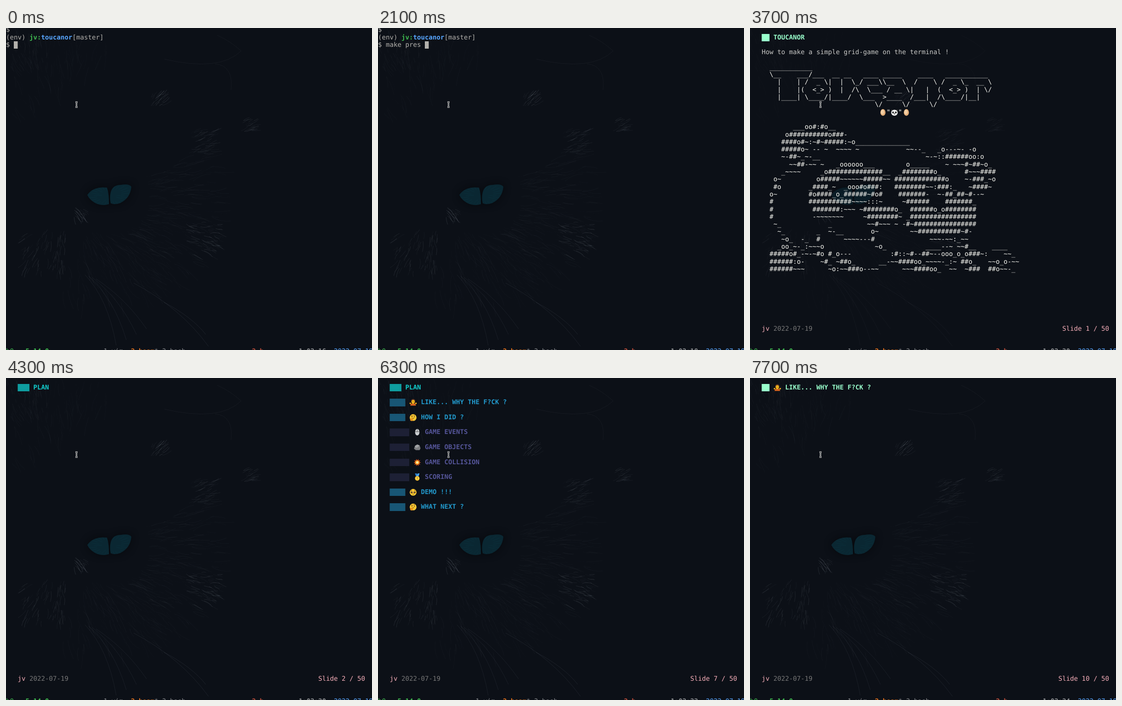
These frames come from a looping animation (797 px wide and 702 px high, 8000 ms). An HTML page with a canvas:

```html
<!DOCTYPE html>
<html lang="en">
<head>
<meta charset="utf-8">
<title>Terminal slides</title>
<style>
  html, body { margin: 0; width: 100%; height: 100%; overflow: hidden; background: #0c1017; }
  #cat, #pointer, #screen { position: absolute; left: 0; top: 0; }
  #screen {
    width: 797px; height: 702px; overflow: hidden;
    font: 14.12px/16.3px "DejaVu Sans Mono", monospace;
    text-rendering: geometricPrecision; font-variant-ligatures: none;
  }
  #screen > * { position: absolute; white-space: pre; }
</style>
</head>
<body>
<canvas id="cat" width="797" height="702"></canvas>
<div id="screen"></div>
<svg id="pointer" width="797" height="702" fill="none">
  <path id="beam" d="M151 161.500h5M153.500 161.500v11M151 172.500h5" stroke="#dcdcdc" stroke-width="3"/>
  <use href="#beam" style="stroke:#111"/>
  <path d="M151 161.500h5M153.500 161.500v11M151 172.500h5" stroke="#16181c" stroke-width="1"/>
</svg>
<script>
const LOOP = 8000, CW = 8.5, RH = 16.3, TOP = -3.7;
const USER = 'jv', DATE = '2022-07-19', COMMAND = 'make pres ';
const GREY = '#b3b1ad', GREEN = '#3fb950', BLUE = '#58a6ff', PINK = '#f7afba', DIM = '#777777', TAB = '#8b8d90';

// Key press times: one per typed character, then one per slide
const TYPING = [800, 800, 900, 1100, 1200, 1400, 1500, 1700, 2100, 2100];
const SLIDES = [3300, 4300, 4800, 5100, 5400, 5800, 6300, 6700, 7100, 7700];
const passed = (times, t) => times.filter(x => x <= t).length;

// The clock redraws every 100 ms, and stands still while the slides load
function seconds(t) {
  const q = t >= 2100 && t < SLIDES[0] ? 2100 : Math.floor(t / 100) * 100;
  return 16 + Math.floor((q + 520) / 1015);
}

// Text and bar colour of each heading level; level n has a bar of n + 1 columns
const LEVELS = {
  1: ['#99ffcc', '#99ffcc'],
  2: ['#11cccc', '#0f9da0'],
  3: ['#2299cc', '#185675'],
  4: ['#555599', '#1d2035']
};

// [slide of first appearance, level, icon, text]
const PLAN = [
  [2, 2, '', 'PLAN'],
  [3, 3, 'shrug', 'LIKE... WHY THE F?CK ?'],
  [4, 3, 'think', 'HOW I DID ?'],
  [5, 4, 'mouse', 'GAME EVENTS'],
  [5, 4, 'rock', 'GAME OBJECTS'],
  [5, 4, 'boom', 'GAME COLLISION'],
  [5, 4, 'medal', 'SCORING'],
  [6, 3, 'plead', 'DEMO !!!'],
  [7, 3, 'think', 'WHAT NEXT ?'],
  [8, 4, 'rock', 'GAME LEVELS'],
  [8, 4, 'mouse', 'GAME MENU'],
  [8, 4, 'medal', 'HIGH SCORES'],
  [9, 3, 'shrug', 'QUESTIONS ?']
];

const ART = String.raw`
___________
\__    ___/___  __ __   ____ _____    ____   ___________
  |    | /  _ \|  |  \_/ ___\\__  \  /    \ /  _ \_  __ \
  |    |(  <_> )  |  /\  \___ / __ \|   |  (  <_> )  | \/
  |____| \____/|____/  \___  >____  /___|  /\____/|__|
                           \/     \/     \/
                              "  "

      ___oo#:#o__
    o##########o###-
   ####o#~:~#~#####:~o______________
   #####o~ -- ~  ~~~~ ~            ~~--_   _o---~- -o
   ~-##~_~-__                           ~-~::######oo:o
     ~~##-~~ ~   _oooooo___        o_____    ~ ~~~#~##~o_
   _~~~~     _o##############__  _########o_      #~~~####
 o~         o#####~~~~~~#####~~ #############o    ~-###_~o
 #o       _####_~  _ooo#o###:   ########~~:###:_   ~####~
o~        #o####_o_######~#o#    #######-  ~-##_##~#--~
#         ###########~~~~:::~     ~######    #######_
#          #######:~~~ ~########o_  ######o_o########
#          -~~~~~~~     ~########~ _#################
 ~_            _         ~~#~~~ ~ -#~################
  ~_        _  ~-__       o~        ~~###########~#-
   ~o_  -_  #      ~~~~---#              ~~~-~~:_~~
  _oo_~-_:~~~o             ~o_          ____--~ ~~#__    ____
#####o#_-~-~#o #_o---          :#::~#--##~--ooo_o_o###~:    ~~_
######:o-    ~#_ ~##o_      __-~~####oo_~~~~-_:~ ##o_   ~~o_o-~~
######~~~      ~o:~~###o--~~      ~~~####oo_  ~~  ~###  ##o~~-_`.split('\n').slice(1);

const oval = (x, y, rx, ry, fill) => `<ellipse cx="${x}" cy="${y}" rx="${rx}" ry="${ry}" fill="${fill}"/>`;
const circle = (x, y, r, fill) => oval(x, y, r, r, fill);
const pair = (dx, y, r, fill) => circle(8 - dx, y, r, fill) + circle(8 + dx, y, r, fill);
const shape = (d, fill) => `<path d="${d}" fill="${fill}"/>`;
const line = (d, color) => `<path d="${d}" fill="none" stroke="${color}"/>`;
const star = (r, fill) => {
  const pts = Array.from({ length: 20 }, (_, i) => {
    const k = i % 2 ? r * 0.55 : r, a = i * Math.PI / 10;
    return (8 + k * Math.cos(a)).toFixed(1) + ',' + (8 + k * Math.sin(a)).toFixed(1);
  });
  return `<polygon points="${pts}" fill="${fill}"/>`;
};
const face = circle(8, 8, 7.3, '#fcc934');

// Small pictures on a 16 x 16 box
const ICONS = {
  egg: oval(8, 8, 5.5, 7.2, '#e3ad78') + oval(7, 7, 3.5, 5, '#f3cfa4'),
  panda: pair(5, 4, 2.4, '#333') + oval(8, 8.5, 7, 6.4, '#f4f4f4') + pair(3, 8, 2, '#333') + oval(8, 11, 1.5, 1, '#222'),
  shrug: shape('M2 15Q2 10 8 10T14 15Z', '#d9641e') + circle(8, 5.4, 4.6, '#6b3c24') +
    oval(8, 6.8, 3.4, 3.8, '#fcc21b') + pair(6, 10, 1.7, '#f9b21d') + pair(1.4, 6.8, 0.6, '#402'),
  think: face + pair(2.5, 6.3, 1, '#4a3010') + line('M4 4L7 4.500M9 3.500L12 3M6 10L10 9.500', '#5b3b13') + circle(4.5, 12.5, 3, '#e8921b'),
  mouse: oval(8, 8, 4.7, 7, '#c9cdd0') + line('M8 1V7M3.500 7H12.500', '#666'),
  rock: shape('M1 11L3 5L8 2L13 4L15 10L13 14H5Z', '#7b7d80') + shape('M3 5L8 2L13 4L9 8L5 9Z', '#a0a2a4'),
  boom: star(8, '#e8501e') + star(6, '#fca21c') + star(3.5, '#fff2a8'),
  medal: shape('M3 0H7L10 6L6 8Z', '#2e7fd0') + shape('M13 0H9L6 6L10 8Z', '#4ba3ea') +
    circle(8, 10.6, 5, '#f0b429') + circle(8, 10.6, 3.7, '#ffd84f') + line('M7 9L8 8.500V13', '#a8700c'),
  plead: face + pair(3.1, 8, 2.2, '#573a17') + pair(2.6, 7.3, 0.7, '#fff') + line('M3 4.500L5.500 3M13 4.500L10.500 3M6.500 12H9.500', '#6b4515')
};

const rowTop = row => TOP + row * RH;
const place = (col, row) => `left:${col * CW}px;top:${rowTop(row).toFixed(2)}px`;
const esc = s => s.replace(/&/g, '&amp;').replace(/</g, '&lt;');
const text = (col, row, s, color, tag = 'span') => `<${tag} style="${place(col, row)};color:${color}">${esc(s)}</${tag}>`;
const bold = (col, row, s, color) => text(col, row, s, color, 'b');
const icon = (col, row, name) => `<svg style="${place(col, row)}" width="17" height="16.3" viewBox="0 0 16 16">${ICONS[name]}</svg>`;

// Whole pixel rows, soft column edges
function bar(col, row, cols, color) {
  const y = Math.round(rowTop(row)), h = Math.round(rowTop(row + 1)) - y;
  return `<svg style="left:0;top:0" width="797" height="702"><rect x="${col * CW}" y="${y}" width="${cols * CW}" height="${h}" fill="${color}"/></svg>`;
}

function heading(row, level, name, label) {
  const [color, fill] = LEVELS[level], col = level + 5;
  return bar(3, row, level + 1, fill) + (name ? icon(col, row, name) : '') +
    bold(name ? col + 3 : col, row, label, color);
}

function shell(typed) {
  return text(0, 0, '$', GREY) + text(0, 1, '(env)', GREY) + bold(6, 1, USER + ':', GREEN) +
    bold(9, 1, 'toucanor', BLUE) + text(17, 1, '[master]', GREY) +
    text(0, 2, '$ ' + typed, GREY) + bar(2 + typed.length, 2, 1, GREY);
}

function cover() {
  return heading(1, 1, '', 'TOUCANOR') +
    text(3, 3, 'How to make a simple grid-game on the terminal !', '#c8c8c6') +
    ART.map((s, i) => text(5, 5 + i, s, '#f8f8f2')).join('') +
    icon(33, 11, 'egg') + icon(36, 11, 'panda') + icon(39, 11, 'egg');
}

const plan = n => PLAN.map(([from, ...item], i) => n >= from ? heading(1 + 2 * i, ...item) : '').join('');

function slide(n) {
  const count = `Slide ${n} / 50`;
  const body = n === 1 ? cover() : n < 10 ? plan(n) : heading(1, 1, 'shrug', PLAN[1][3]);
  return body + text(3, 40, USER, PINK) + text(6, 40, DATE, DIM) + text(92 - count.length, 40, count, PINK);
}

function status(sec) {
  return text(0, 43, 'h0', GREEN) + bold(5, 43, '5.14.0', GREEN) + text(25, 43, '1 vim', TAB) +
    bold(32, 43, '2 beam', '#e0701c') + text(38, 43, '* 3 bash', TAB) +
    bold(63, 43, '2 b', '#c0503c') + bold(75, 43, '1:02:' + sec, TAB) + text(84, 43, DATE, BLUE);
}

// Bright tufts of fur: x, y, radius, strength
const TUFTS = [
  [330, 158, 14, 0.15], [426, 250, 26, 0.1], [526, 215, 14, 0.12], [428, 460, 36, 0.13],
  [85, 485, 46, 0.11], [158, 405, 14, 0.16], [30, 40, 60, 0.06]
];

// Wallpaper: seeded hairs that flow away from the brow, and one eye
function drawCat() {
  const g = cat.getContext('2d');
  let seed = 7;
  const rnd = () => (seed = seed * 16807 % 2147483647) / 2147483647;
  const spread = k => (rnd() - 0.5) * 2 * k;

  const curve = (x, y, cx, cy, ex, ey, a) => {
    g.strokeStyle = `rgba(150,158,168,${a})`;
    g.beginPath();
    g.moveTo(x, y);
    g.quadraticCurveTo(cx, cy, ex, ey);
    g.stroke();
  };
  const hair = (x, y, len, a) => {
    const dir = Math.atan2(y - 365, x - 125) + spread(0.3), bend = dir + spread(0.4);
    curve(x, y, x + Math.cos(bend) * len / 2, y + Math.sin(bend) * len / 2,
      x + Math.cos(dir) * len, y + Math.sin(dir) * len, a * (0.4 + rnd()));
  };

  for (const [x, y, r, a] of TUFTS)
    for (let i = 0; i < r * 1.7; i++) hair(x + spread(r), y + spread(r), 8 + rnd() * 16, a);
  for (let i = 0; i < 420; i++) {
    const a = -0.5 + rnd() * 2.6, d = 85 + rnd() * 150;
    hair(225 + Math.cos(a) * d, 365 + Math.sin(a) * d, 15 + rnd() * 30, 0.045);
  }
  for (let i = 0; i < 90; i++) {
    const x = rnd() * 220;
    hair(x, rnd() * (200 - x * 0.6), -15 - rnd() * 30, 0.045);
  }

  // Ear and whiskers
  curve(460, 16, 488, 28, 512, 50, 0.08);
  curve(512, 50, 465, 96, 345, 68, 0.08);
  curve(455, 78, 496, 82, 490, 135, 0.07);
  for (let i = 0; i < 4; i++) curve(172 + i * 8, 538 + i * 3, 222 + i * 13, 590, 240 + i * 22, 692 - i * 12, 0.11);
  for (let i = 0; i < 2; i++) curve(278 + i * 66, 556 + i * 42, 380 + i * 25, 610 + i * 20, 441 - i * 6, 694 - i * 26, 0.13);

  // Eye: soft dark rim, two lobes and a slit between them
  const lobes = new Path2D('M177 364Q190 345 220 348Q225 364 224 384Q210 389 195 382Q182 375 177 364Z' +
    'M228 358Q232 342 250 342Q268 339 273 346Q271 371 248 382Q235 386 228 382Q225 370 228 358Z');
  g.shadowColor = '#07090d';
  g.shadowBlur = 16;
  g.fillStyle = '#0a2732';
  g.fill(lobes);
  g.shadowBlur = 0;
  g.clip(lobes);
  g.strokeStyle = 'rgba(26,90,105,.14)';
  for (let i = 0; i < 30; i++) {
    const a = i * 0.21, c = Math.cos(a), s = Math.sin(a) * 0.6, r = 14 + rnd() * 16;
    g.beginPath();
    g.moveTo(226 + c * r, 365 + s * r);
    g.lineTo(226 + c * (r + 18), 365 + s * (r + 18));
    g.stroke();
  }
}

const cat = document.getElementById('cat'), screenBox = document.getElementById('screen');
let shown = '';

function frame() {
  const t = performance.now() % LOOP;
  const n = passed(SLIDES, t), typed = COMMAND.slice(0, passed(TYPING, t)), sec = seconds(t);
  const key = [n, typed, sec].join('|');
  if (key !== shown) {
    shown = key;
    screenBox.innerHTML = (n ? slide(n) : shell(typed)) + status(sec);
    cat.style.opacity = n === 1 ? 0.55 : 1;
  }
  requestAnimationFrame(frame);
}

drawCat();
frame();
</script>
</body>
</html>
```
